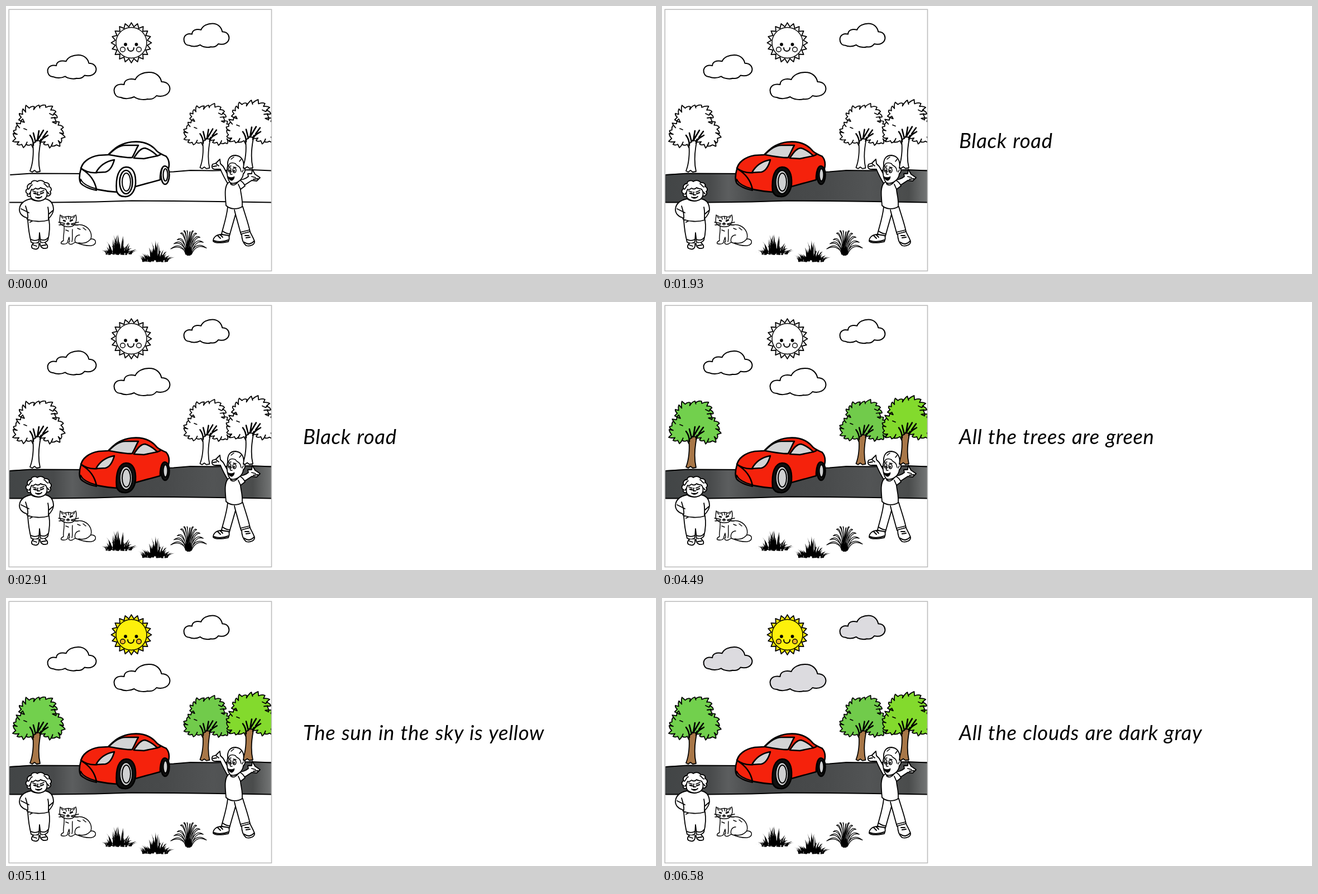
Write an HTML page that moves like this. It is 1164 px wide and 481 px high and loops after 8000 ms.

```html
<!DOCTYPE html>
<html lang="en">
<head>
<meta charset="utf-8">
<title>Colour the scene</title>
<style>
html, body { margin: 0; width: 100%; height: 100%; overflow: hidden; background: #fff; }
svg { display: block; width: 1164px; height: 481px; }
#page { fill: #fff; stroke: #000; stroke-width: 1.8; stroke-linejoin: round; stroke-linecap: round; }
#page .line { fill: none; }
#page .ink { fill: #000; }
#caption { font: italic 36.5px Lato, "Open Sans", sans-serif; letter-spacing: .65px; word-spacing: 1.5px; fill: #000; }
#car { stroke-width: 2.6; }
.car .body { fill: #f5220c; }
.car .glass { fill: #d3d4d5; }
.car .tyre { fill: #111; }
.car .rim { fill: #cfd0d1; }
.car .bumper { fill: #5d3b38; }
.road .tarmac { fill: url(#asphalt); }
.trees .crown { fill: var(--leaf); }
.trees .trunk { fill: #a87748; }
.sun .rays, .sun .disc { fill: #fdf00b; }
.sun .cheek { fill: #f3b52a; }
.clouds .cloud { fill: #dcdbdf; }
</style>
</head>
<body>
<svg id="stage" viewBox="0 0 1164 481">
  <defs>
    <linearGradient id="asphalt">
      <stop offset="0" stop-color="#424546"/>
      <stop offset=".17" stop-color="#484a4b"/>
      <stop offset=".24" stop-color="#5c5e5f"/>
      <stop offset=".36" stop-color="#434546"/>
      <stop offset=".6" stop-color="#484a4b"/>
      <stop offset=".78" stop-color="#525455"/>
      <stop offset=".93" stop-color="#4a4c4c"/>
      <stop offset="1" stop-color="#747676"/>
    </linearGradient>
    <clipPath id="edge"><rect x="5" y="6" width="470" height="470"/></clipPath>
    <path id="puff" class="cloud" vector-effect="non-scaling-stroke" d="M12 45C3 45 0 38 0 32C1 23 9 20 18 22C18 14 27 10 38 13C42 4 53 0 63 0C76 0 83 8 85 17C95 17 100 23 100 30C99 40 88 45 76 42C72 47 66 49 60 48C54 50 42 49 36 44C28 48 18 48 12 45Z"/>
  </defs>
  <g id="page" clip-path="url(#edge)">
    <g stroke-width="2">
      <use href="#puff" transform="translate(74.5 88) scale(.87 .87)"/>
      <use href="#puff" transform="translate(193.5 119)"/>
      <use href="#puff" transform="translate(318.5 31.5) scale(.81 .87)"/>
    </g>
    <g id="sun">
      <path class="rays" id="rays"/>
      <circle class="disc" cx="224.5" cy="66" r="27.5" stroke-width="1.5"/>
      <g stroke-width="1.4">
        <circle class="cheek" cx="209" cy="78" r="4.3"/><circle class="cheek" cx="238" cy="78" r="4.3"/>
      </g>
      <circle class="ink" cx="214" cy="69" r="2"/><circle class="ink" cx="233.5" cy="69" r="2"/>
      <path class="line" stroke-width="2" d="M218 75C218 83 229 83 229 75"/>
    </g>
    <path class="tarmac" stroke="none" d="M6 302L45 300L150 301L300 297L330 295L475 294V353L380 351L225 350L160 352L6 353Z"/>
    <path class="line" stroke-width="2" d="M8 303L45 300.5L150 301L300 297.5L330 295L370 295.5L440 294L475 295.5M7 352.5L85 352.5L160 351.5L225 349.5L300 350L380 351L475 352.5"/>
    <g id="trees"></g>
    <g id="car">
      <ellipse class="tyre" cx="285" cy="303" rx="7.5" ry="17"/>
      <path class="body" d="M134 293C136 281 148 271 166 268L183 267C196 253 208 246 225 244C245 242 259 248 268 258C272 264 281 267 287 270C292 276 293 284 291 292C282 280 276 292 276 312L232 324L199 334C180 333 150 328 136 320C130 316 131 303 134 293Z"/>
      <path class="bumper" stroke-width="2" d="M134 311C137 319 149 325 161 328L162 331C148 328 138 323 133 317Z"/>
      <path class="glass" d="M184 267C194 256 204 250 214 250L237 250C233 257 231 263 226 272C214 273 198 269 184 267Z"/>
      <path class="glass" d="M229 273C235 263 241 255 249 255C259 258 266 264 271 269L247 274Z"/>
      <path class="glass" d="M161 299C167 288 177 279 194 276C191 287 186 296 178 298Z"/>
      <path class="line" d="M134 291C143 298 152 300 163 299M136 293C151 302 159 314 162 329M271 269L276 267"/>
      <path class="tyre" d="M198 332C196 306 202 290 215 289C228 289 233 302 232 320C230 334 223 343 212 342C205 342 200 338 198 332Z"/>
      <ellipse class="rim" cx="215" cy="316" rx="11.5" ry="21"/>
      <ellipse class="rim" cx="215.5" cy="316" rx="7.5" ry="16" stroke-width="2"/>
      <ellipse class="rim" cx="285.5" cy="303" rx="4" ry="11" stroke-width="2.2"/>
    </g>
    <g id="curly" transform="translate(-1 0)">
      <path d="M40 384C41 400 43 412 46 424C52 427 58 426 60 423L61 407L63 424C68 426 74 424 76 420C79 408 80 396 78 384Z"/>
      <path d="M50 426C46 430 45 435 52 436C58 438 61 433 60 426M62 426C62 434 69 437 75 434C77 430 73 427 71 425"/>
      <path d="M46 346C52 351 64 351 71 346C82 348 86 356 86 366C85 374 80 379 77 382L78 384C65 388 50 387 39 383L38 380C30 378 25 372 25 365C26 353 36 348 46 346Z"/>
      <path class="line" d="M36 359C39 368 41 375 40 381M76 361C78 369 77 376 77 382M28 364L42 371M85 367L77 374M44 388L48 386M46 419C51 422 56 421 60 419M63 419C68 421 73 420 76 416M50 429L56 431M65 430L72 429"/>
      <path d="M45 342C39 343 38 339 40 337C35 335 36 329 40 328C37 322 43 318 46 319C46 313 54 312 57 315C62 311 69 314 70 317C76 316 80 320 78 324C83 326 83 331 80 333C83 337 79 342 74 341C72 347 65 350 59 350C52 349 46 346 45 342Z"/>
      <path class="line" d="M45 342C44 337 45 332 47 329C50 331 52 328 54 327C58 330 61 328 63 326C66 329 70 327 72 329C75 333 75 337 74 341M41 329C45 326 44 322 48 321M76 325C72 323 72 320 69 319M42 338L45 334M78 337L74 333M49 332L55 334M62 334L69 331M58 334L57 339L61 339M54 343C58 346 62 345 65 342"/>
      <path stroke-width="2.4" d="M51 336L55 337M63 337L68 335M57 344L61 344"/>
    </g>
    <g id="cat" stroke-width="1.4">
      <path d="M104 394C105 405 102 413 103 421C98 423 97 427 101 427C107 428 111 426 111 421L113 415L114 422C110 426 114 429 119 427L124 424C134 428 146 431 153 430C163 428 163 418 152 418C155 407 148 396 136 393C128 391 123 396 120 390Z"/>
      <path class="line" d="M124 424C122 418 125 411 132 411M119 401C118 410 120 416 118 423M130 425C138 427 146 425 152 418M128 399L133 401M138 398L143 402M107 402L112 404"/>
      <path d="M97 390C95 384 97 379 97 375L104 379C109 377 115 377 118 379L125 375C127 381 126 387 123 392C118 398 104 398 97 390Z"/>
      <path class="line" d="M99 378L102 381M123 378L120 381M107 379L108 383M112 378L112 382M116 379L115 383M108 391L111 393L114 391M105 390L94 388M105 392L95 393M117 391L130 388M117 392L129 393"/>
      <path stroke-width="2.6" d="M103 385L106 386M115 386L119 384M110 390L112 390"/>
    </g>
    <g id="grass" class="ink" stroke="none"></g>
    <path id="reeds" stroke-width="1.2"/>
    <g id="waver">
      <path d="M399 322C393 312 388 303 384 293L377 293C370 294 367 290 370 284L376 282L383 275L384 283L389 288C393 296 397 303 403 311Z"/>
      <path d="M417 326C428 322 434 317 440 313L449 314L455 308L446 302L441 293L440 301L433 301L434 306C428 311 422 312 414 313Z"/>
      <path class="line" d="M371 288L377 287M376 283L381 287M440 306L447 308M443 311L451 310"/>
      <path d="M397 361C395 380 389 396 386 409C391 412 396 413 400 413C404 398 408 385 411 374C415 388 418 400 421 410L437 405C434 390 428 374 424 360Z"/>
      <path class="line" d="M411 374L409 366M388 404C392 407 397 409 401 409M420 406L436 402"/>
      <path d="M386 410C377 410 371 415 371 422C376 427 388 425 398 423C400 419 400 415 399 412ZM422 409C422 418 424 425 430 430C438 432 446 428 445 422C442 414 439 410 437 405Z"/>
      <path class="line" stroke-width="2" d="M372 421C380 424 390 423 398 420M379 412L384 417M384 411L388 415M427 424C433 429 440 427 444 422M428 412L435 412M430 416L437 415"/>
      <path d="M398 317C390 325 393 343 394 358C402 366 416 365 423 360C424 345 420 336 420 329L428 323C426 318 422 314 417 312Z"/>
      <path class="line" d="M402 319C407 324 413 320 416 315M420 329L416 320"/>
      <path d="M397 287C394 300 397 314 403 318C414 320 424 311 425 301C429 298 429 291 425 291C428 276 420 269 411 268C401 268 396 275 397 287Z"/>
      <path class="line" stroke-width="1.5" d="M398 289C399 281 405 280 411 283C414 289 419 285 421 297M403 275L408 271M418 279L421 275M400 288L403 287M407 289L412 290M404 297C400 300 401 303 405 302M425 294L423 298"/>
      <g stroke-width="1.5">
        <ellipse cx="400.5" cy="294" rx="2.3" ry="4"/><ellipse cx="409" cy="295" rx="3" ry="4.2"/>
      </g>
      <circle class="ink" cx="400.5" cy="295" r=".6"/><circle class="ink" cx="408.5" cy="296" r=".8"/>
      <path class="ink" stroke-width="1" d="M397 306C402 309 406 308 409 306C408 315 401 316 397 306Z"/>
    </g>
  </g>
  <rect x="5.2" y="6.2" width="470.3" height="469.3" fill="none" stroke="#bdbdbd" stroke-width="1.6"/>
  <text id="caption" x="532" y="255"></text>
</svg>
<script>
const steps = [
  [0, ''],
  [460, 'The car is red with black windows', 'car'],
  [1930, 'Black road', 'road'],
  [3560, 'All the trees are green', 'trees'],
  [5110, 'The sun in the sky is yellow', 'sun'],
  [6580, 'All the clouds are dark gray', 'clouds']
];
const $ = id => document.getElementById(id);

let seed = 7;
const rand = (a, b) => {
  seed = (seed * 16807) % 2147483647;
  return a + (b - a) * seed / 2147483647;
};
const pt = (x, y) => x.toFixed(1) + ' ' + y.toFixed(1);

function rays(cx, cy, n) {
  let d = '';
  for (let i = 0; i < 2 * n; i++) {
    const a = Math.PI * i / n, r = i % 2 ? 29 : 36;
    d += (i ? 'L' : 'M') + pt(cx + r * Math.sin(a), cy - r * Math.cos(a));
  }
  return d + 'Z';
}

// Leafy edge: every piece of a rough outline bulges out and ends in a small tip.
function crown() {
  const edge = [[48, 5], [59, 4], [69, 9], [75, 16], [77, 25], [73, 33], [82, 36], [88, 44], [86, 52],
    [89, 61], [83, 67], [80, 74], [71, 71], [64, 74], [57, 69], [50, 64], [42, 70], [34, 74], [25, 70],
    [17, 74], [10, 69], [4, 63], [6, 54], [4, 47], [11, 41], [12, 35], [20, 31], [14, 25], [16, 18],
    [22, 13], [28, 6], [38, 8]];
  return edge.reduce((d, [x, y], i) => {
    const [u, v] = edge[(i + 1) % edge.length];
    const len = Math.hypot(u - x, v - y), nx = (v - y) / len, ny = (x - u) / len;
    const tip = rand(2, 6);
    return d + 'Q' + pt((x + u) / 2 + nx * 4, (y + v) / 2 + ny * 4) + ' ' +
      pt(u + nx * tip, v + ny * tip) + 'L' + pt(u - nx * 2, v - ny * 2);
  }, 'M' + pt(...edge[0])) + 'Z';
}

function tree(x, y, scale, leaf) {
  return `<g transform="translate(${x} ${y}) scale(${scale})" style="--leaf:${leaf}">
    <path class="crown" d="${crown()}"/>
    <path class="trunk" d="M36 72C38 88 36 108 31 120L35 122L39 119L43 122L49 121C46 108 46 88 50 68L44 64Z"/>
    <path class="line" stroke-width="2.6" d="M37 74C37 65 34 60 31 56M41 68L37 52M44 66L47 48M45 64L55 47M49 70C51 62 57 60 63 56M54 60L62 49"/>
    <path class="line" d="M66 17L72 20L75 17M69 25L76 24M20 44L25 46"/>
  </g>`;
}

function tuft(cx, cy, n, height) {
  let d = '';
  for (let i = 0; i < n; i++) {
    const k = 2 * i / (n - 1) - 1, x = cx + k * 22 + rand(-2, 2), y = cy + rand(-3, 3);
    const h = height * (1 - Math.abs(k) ** .9 * .85) * rand(.4, 1.05);
    const tx = cx + k * 34 + rand(-5, 5), ty = cy - h;
    d += 'M' + pt(x - 2, y) + 'Q' + pt(x - 1, cy - h * .6) + ' ' + pt(tx, ty) +
      'Q' + pt(x + 1.3, cy - h * .5) + ' ' + pt(x + 2, y) + 'Z';
  }
  return `<path d="${d}"/>`;
}

function reeds(cx, cy, n) {
  let d = '';
  for (let i = 0; i < n; i++) {
    const k = 2 * i / (n - 1) - 1, h = 44 * (1 - .75 * k * k) * rand(.8, 1.05);
    const x = cx + 4 * k, tip = pt(cx + 32 * k, cy - h);
    d += 'M' + pt(x - 1, cy) + 'Q' + pt(cx + 13 * k, cy - 18 - h * .7) + ' ' + tip +
      'Q' + pt(cx + 14 * k, cy - 14 - h * .6) + ' ' + pt(x + 1, cy) + 'Z';
  }
  return d;
}

$('rays').setAttribute('d', rays(224.5, 66, 20));
$('trees').innerHTML = tree(12, 176, 1, '#72d04d') + tree(318, 176, .95, '#71cb4b') + tree(393, 169.5, 1, '#83da2d');
$('grass').innerHTML = tuft(201, 444, 44, 40) + tuft(267, 457, 44, 38) +
  '<path d="M317 431L325 439L327 430L331 438L339 430L330 448H324Z"/>';
$('reeds').setAttribute('d', reeds(327, 446, 12));

let shown = -1;
function frame(now) {
  const t = now % 8000, at = steps.findLastIndex(s => s[0] <= t);
  if (at !== shown) {
    shown = at;
    $('caption').textContent = steps[at][1];
    $('stage').setAttribute('class', steps.slice(1, at + 1).map(s => s[2]).join(' '));
  }
  requestAnimationFrame(frame);
}
frame(performance.now());
</script>
</body>
</html>
```
